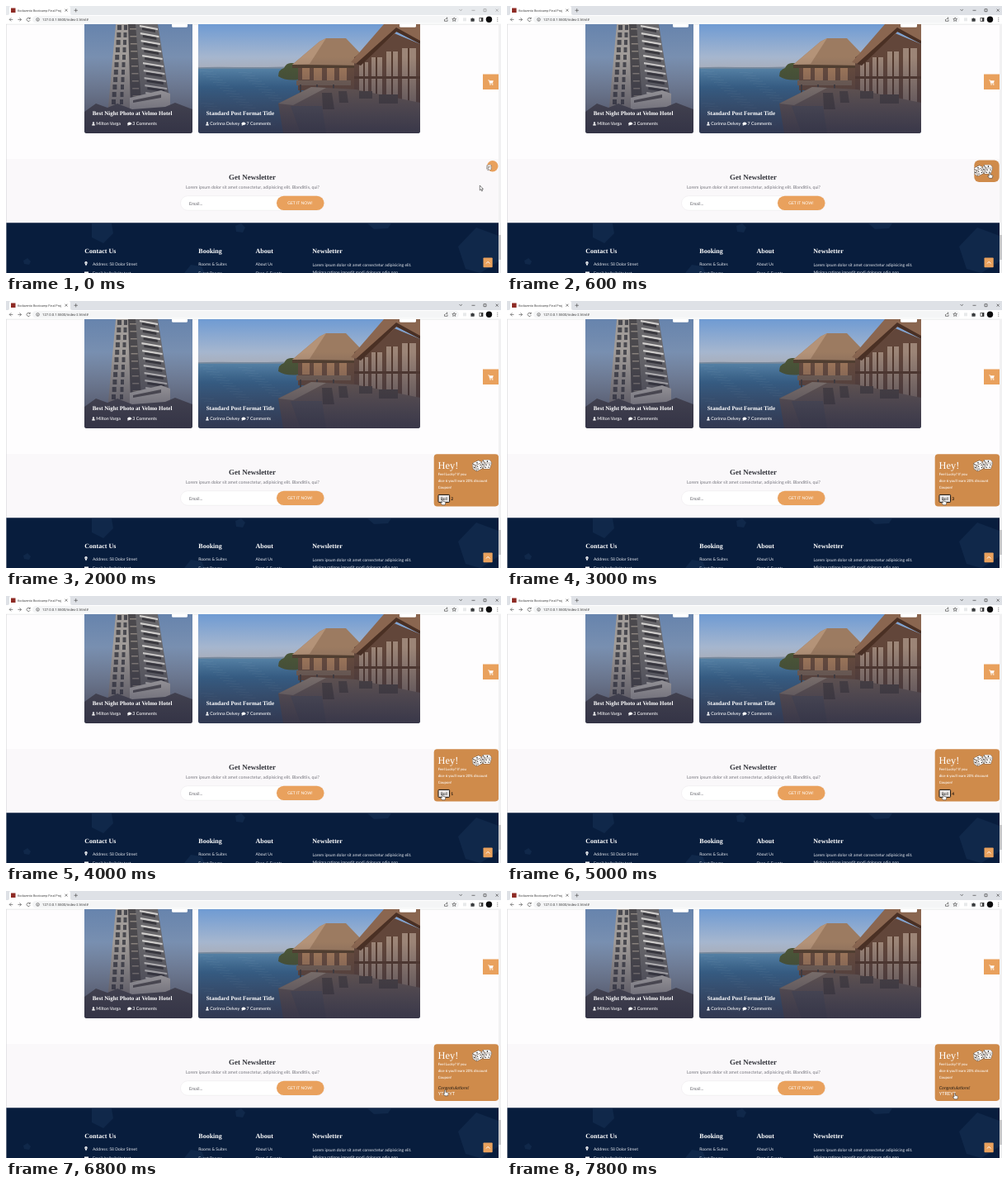
Write an HTML page that moves like this. It is 600 by 323 pixels and loops after 8 s.

```html
<!DOCTYPE html>
<html lang="en">
<head>
<meta charset="utf-8">
<title>Newsletter dice widget</title>
<style>
  html, body { margin: 0; width: 100%; height: 100%; overflow: hidden; background: #fff; }
  svg { display: block; width: 100vw; height: 100vh; }
  text { font: 5px Lato, sans-serif; text-rendering: geometricPrecision; }
  .head { font: bold 8px "Liberation Serif", serif; fill: #fff; }
  .card { font-size: 7px; }
  .meta { font-size: 5.3px; font-weight: 500; }
  .tab { font: 3.8px Roboto, sans-serif; fill: #444; }
  .line { fill: none; stroke: #555; stroke-width: .7; }
  .promo { font-size: 4.4px; font-weight: 500; }
</style>
</head>
<body>
<svg viewBox="0 0 600 323" preserveAspectRatio="none">
  <defs>
    <linearGradient id="shade" x2="0" y2="1">
      <stop offset=".3" stop-color="#2b2b40" stop-opacity="0"/>
      <stop offset=".85" stop-color="#2b2b40" stop-opacity=".62"/>
      <stop offset="1" stop-color="#2b2b40" stop-opacity=".78"/>
    </linearGradient>
    <linearGradient id="dusk" x2="0" y2="1">
      <stop stop-color="#6784ad"/><stop offset="1" stop-color="#a0a9b8"/>
    </linearGradient>
    <linearGradient id="sky" x2="0" y2="1">
      <stop stop-color="#6f9bd3"/><stop offset="1" stop-color="#b9c0cd"/>
    </linearGradient>
    <linearGradient id="sea" x2="0" y2="1">
      <stop stop-color="#5c8db3"/><stop offset=".3" stop-color="#3a719f"/><stop offset="1" stop-color="#48698f"/>
    </linearGradient>
    <linearGradient id="deck" x2="0" y2="1">
      <stop stop-color="#756257"/><stop offset="1" stop-color="#6d6468"/>
    </linearGradient>
    <clipPath id="clipA"><path d="M95 22h131v129q0 3-3 3h-125q-3 0-3-3z"/></clipPath>
    <clipPath id="clipB"><path d="M233 22h269v129q0 3-3 3h-263q-3 0-3-3z"/></clipPath>
    <clipPath id="clipPanel"><rect id="panelClip"/></clipPath>
    <clipPath id="page"><rect y="22" width="597" height="301"/></clipPath>
    <g id="person" fill="#fff"><circle r="1.1" cy="-1.1"/><path d="M-1.8 2q0-2.1 1.8-2.1t1.8 2.1z"/></g>
    <g id="chat" fill="#fff"><ellipse rx="2.4" ry="1.8"/><path d="M-2 .5l-.3 2 2.2-.9z"/></g>
    <g id="die">
      <path d="M-5-4L3-6 6.5-3 6 5-2 7-6 3z" fill="#5a4a3e"/>
      <path d="M-4.7-3.7L3-5.6 6.2-2.8-1.5-.9z" fill="#fff"/>
      <path d="M-5.2-3L-1.9-.4-2.1 6.5-5.7 2.8z" fill="#dedbd8"/>
      <path d="M-1.4-.4L6.2-2.2 5.6 4.7-1.6 6.5z" fill="#f5f3f1"/>
      <g fill="#1c1a19"><circle cx=".7" cy="-3.2" r=".8"/><circle cx="-3.8" cy="1.7" r=".7"/>
      <circle cx=".3" cy="1.2" r=".65"/><circle cx="4.2" cy=".2" r=".65"/>
      <circle cx=".2" cy="4.3" r=".65"/><circle cx="3.9" cy="3.3" r=".65"/></g>
    </g>
  </defs>

  <rect width="600" height="323" fill="#fefdfe"/>

  <!-- browser bar -->
  <rect id="bar" width="600" height="11"/>
  <path d="M2 11q2 0 2-2V2q0-2 2-2h70q2 0 2 2v7q0 2 2 2z" fill="#fff"/>
  <rect y="11" width="600" height="11" fill="#fff"/>
  <rect x="32" y="12" width="517" height="8.6" rx="4.3" fill="#f4f5f6"/>
  <path d="M0 22.2H600" stroke="#dcdde0" stroke-width=".6"/>
  <rect x="6" y="2.5" width="5.5" height="5.5" fill="#8e2b25"/>
  <text class="tab" x="14" y="6.8">Kodavento Bootcamp Final Proj</text>
  <text class="tab" x="44" y="17.9" style="font-size:4.25px">127.0.0.1:5500/index-2.html#</text>
  <path class="line" d="M71.5 3.7l3 3m0-3l-3 3M82.5 5.3h4.4m-2.2-2.2v4.4"/>
  <path id="controls" class="line" d="M549.5 4l1.7 1.7L552.9 4M564.5 5.3h4M579 3.7h3v3h-3zM593.7 3.7l3 3m0-3l-3 3"/>
  <path class="line" d="M8.3 16.4H4.2m2-2l-2 2 2 2M14.4 16.4h4.1m-2-2l2 2-2 2M29 15.2a2.1 2.1 0 1 0 .2 2M29.2 13.7v1.7h-1.7"/>
  <circle class="line" cx="38.5" cy="16.4" r="1.8"/><path class="line" d="M38.5 16.2v1.2"/>
  <path class="line" d="M531.5 16v2.3h3.6V16.5M532.5 16.3q.5-1.6 2.5-1.6m-1-1l1.2 1-1.2 1M543.2 13.9l.7 1.6 1.7.1-1.3 1.1.4 1.7-1.5-.9-1.5.9.4-1.7-1.3-1.1 1.7-.1z"/>
  <rect x="554" y="14.3" width="4" height="4" fill="#e8eaeb"/>
  <path d="M563.4 15h1.4q.7-1.7 1.4 0h1.4v1.4q1.3.6 0 1.2v1.2h-4.2z" fill="#3a3c3e"/>
  <rect x="574" y="14.3" width="4" height="4.2" fill="none" stroke="#333" stroke-width=".7"/><path d="M576 14.3h2v4.2h-2z" fill="#333"/>
  <circle cx="585.5" cy="16.3" r="3.7" fill="#0b0b0c"/>
  <g fill="#555"><circle cx="595.8" cy="14.6" r=".5"/><circle cx="595.8" cy="16.4" r=".5"/><circle cx="595.8" cy="18.2" r=".5"/></g>

  <!-- tower card -->
  <g clip-path="url(#clipA)">
    <path d="M95 22h131v132h-131z" fill="url(#dusk)"/>
    <path d="M121 154L133 22h22l6 132z" fill="#a09b98"/>
    <path d="M148 22h11l9 132h-16z" fill="#4b494d"/>
    <path d="M157 22h27l15 96v36h-32z" fill="#68676b"/>
    <g id="tower"></g>
    <path d="M150 111l38-9 11 4v20h-49z" fill="#c9c6c3"/>
    <path d="M154 114l34-7v4l-34 6z" fill="#5d5a5c"/>
    <path d="M95 128l14-10 14 5 12-5 18 7 40-3 12-5 21 8v30H95z" fill="#55545c"/>
    <path d="M95 22h131v132h-131z" fill="url(#shade)"/>
    <rect x="201" y="20" width="19" height="5.8" rx="1.5" fill="#fff"/>
  </g>

  <!-- villa card -->
  <g clip-path="url(#clipB)">
    <path d="M233 22h269v54h-269z" fill="url(#sky)"/>
    <path d="M233 75h269v79h-269z" fill="url(#sea)"/>
    <path d="M233 75.7v-1.4q20-1 45-.4t60-.4v2.2z" fill="#8395a8"/>
    <g id="waves" fill="none" stroke="#8fb2cd" stroke-width=".5" opacity=".3"></g>
    <path d="M330 85q0-8 7-10 3-7 10-6 6-1 8 6v14q-16 2-25-4z" fill="#4d5936"/>
    <path d="M354 66h80v36h-80z" fill="#6b4d3d"/>
    <path d="M359 72h9v17h-9zm14 0h10v19h-10zm16 0h9v19h-9zm15 0h9v22h-9z" fill="#a87d5c"/>
    <path d="M347 71l33-28 8-4h24l24 25-10 8z" fill="#9c7b61"/>
    <path d="M347 71l33-28 8-4-20 31z" fill="#b49378"/>
    <path d="M347 71l79 1 10-8v4l-8 7H347z" fill="#54402f"/>
    <path d="M352 90h66v6h-66z" fill="#7d6859"/>
    <path d="M356 95h2v13h-2zm20 0h2v13h-2zm20 0h2v13h-2z" fill="#47413f"/>
    <path d="M422 62l46-30 34 14v82h-80z" fill="#62463a"/>
    <path d="M428 68h11v37h-11zm15-6h13v47h-13zm18-7h14v57h-14zm19-4h17v67h-17z" fill="#9c8577"/>
    <path d="M433 68h2v37h-2zm15-6h2v47h-2zm19-7h2v57h-2zm20-4h2v67h-2z" fill="#553a2d"/>
    <path d="M422 85h80v3h-80z" fill="#553a2d"/>
    <path d="M418 68l40-46h44v22l-26-15-47 42z" fill="#8a6650"/>
    <path d="M424 70l49-44 29 16v4l-29-15-43 41z" fill="#4a3024"/>
    <path d="M330 118l40-20 54 3 78 16v37H336z" fill="url(#deck)"/>
    <path d="M330 118l40-20 18 1-40 21z" fill="#9a8a7d"/>
    <path d="M383 105h12l3 20h-14zm20-2h10l2 14h-11zM428 103h16v9h-16zm24 4h23v11h-23z" fill="#514744"/>
    <path d="M345 121h38l5 33h-31z" fill="#5f5d64"/>
    <path d="M233 22h269v132h-269z" fill="url(#shade)"/>
    <rect x="477" y="20" width="20" height="5.8" rx="1.5" fill="#fff"/>
  </g>

  <g fill="#fff">
    <text class="head card" x="104.7" y="131.5">Best Night Photo at Velmo Hotel</text>
    <text class="head card" x="242.7" y="131.5">Standard Post Format Title</text>
    <use href="#person" x="106" y="142.4"/><text class="meta" x="109.3" y="144.4">Milton Varga</text>
    <use href="#chat" x="149.7" y="142.3"/><text class="meta" x="153.3" y="144.4">3 Comments</text>
    <use href="#person" x="244" y="142.4"/><text class="meta" x="247.3" y="144.4">Corinna Delvey</text>
    <use href="#chat" x="288" y="142.3"/><text class="meta" x="291.5" y="144.4">7 Comments</text>
  </g>

  <!-- newsletter -->
  <path d="M0 185h597v78H0z" fill="#faf8fa"/>
  <text class="head" x="298.5" y="209.8" text-anchor="middle" style="font-size:9px;fill:#33343b">Get Newsletter</text>
  <text x="299" y="221" text-anchor="middle" fill="#74747c" style="font-size:5.27px">Lorem ipsum dolor sit amet consectetur, adipisicing elit. Blanditiis, qui?</text>
  <rect x="211.5" y="229.7" width="174.5" height="17.6" rx="8.8" fill="#fff" stroke="#efedf0" stroke-width=".7"/>
  <text x="222" y="240.5" fill="#66666c" style="font-size:5.3px">Email...</text>
  <rect x="328" y="229.7" width="57.5" height="17.3" rx="8.65" fill="#e9a15d"/>
  <text x="356.5" y="240.2" text-anchor="middle" fill="#fff">GET IT NOW!</text>

  <!-- footer -->
  <path d="M0 262.2h597v61H0z" fill="#081d3d"/>
  <g fill="#10284a">
    <path d="M104 263h24l2 12-12 12-14-7z"/><path d="M278 266l7-3 5 5-3 6-8-1z"/>
    <path d="M438 263h29l-4 6-17 1z"/><path d="M548 291l22-23 27 10v31l-22 14-18-5z"/>
    <path d="M21 308l5-3 4 4-2 4-6-1z"/><path d="M216 323l8-10 13 2 4 8z"/>
  </g>
  <g fill="#e6e9ef">
    <text class="head" x="95.3" y="298.8">Contact Us</text>
    <text class="head" x="233.3" y="298.8">Booking</text>
    <text class="head" x="302.5" y="298.8">About</text>
    <text class="head" x="371.3" y="298.8">Newsletter</text>
    <path d="M97 314.5l-1.5-3a1.7 1.7 0 1 1 3 0z" fill="#fff"/><circle cx="97" cy="311" r=".6" fill="#081d3d"/>
    <path d="M95 321.5h5v1.5h-5z" fill="#fff"/>
    <text x="105" y="314">Address: 58 Dolor Street</text>
    <text x="105" y="324.8">Email: hello@site.test</text>
    <text x="233.3" y="314">Rooms &amp; Suites</text><text x="233.3" y="324.8">Event Rooms</text>
    <text x="302.5" y="314">About Us</text><text x="302.5" y="324.8">Shop &amp; Events</text>
    <text x="371.5" y="314.8">Lorem ipsum dolor sit amet consectetur adipisicing elit.</text>
    <text x="371.5" y="323.8">Minima ratione impedit modi dolorum odio non</text>
  </g>
  <rect x="578.5" y="304.5" width="11.2" height="11.7" rx=".8" fill="#e9a15d"/>
  <path d="M582 311.5l2.2-2.2 2.2 2.2" fill="none" stroke="#fff"/>

  <!-- side controls -->
  <path d="M578 82.5h19v18.5h-19z" fill="#e9a15d"/>
  <path d="M584.3 89.8h1.3l.9 4h3.8" fill="none" stroke="#fff" stroke-width=".8"/>
  <path d="M585.8 90.3h5l-.8 2.8h-3.6z" fill="#fff"/><circle cx="587" cy="95" r=".7" fill="#fff"/><circle cx="589.8" cy="95" r=".7" fill="#fff"/>
  <path d="M.3 22v301" stroke="#cfcfd2" stroke-width=".6"/>
  <path d="M597 22h3v301h-3z" fill="#f1f1f2"/><path d="M597.4 277h2.2v30h-2.2z" fill="#b9babd"/>

  <!-- dice widget -->
  <g clip-path="url(#page)">
    <rect id="panel"/>
    <g id="content" clip-path="url(#clipPanel)" fill="#fff">
      <text class="head" x="523.6" y="202.6" style="font-size:12.4px;font-weight:normal">Hey!</text>
      <text class="promo" x="523.7" y="211.2">Feel Lucky? If you</text>
      <text class="promo" x="523.7" y="219.2">dice 6 you'll earn 20% discount</text>
      <text class="promo" x="523.7" y="227">Coupon!</text>
      <use href="#die" transform="translate(571 199) rotate(-12)"/>
      <use href="#die" transform="translate(582 197) rotate(14)"/>
      <g id="game">
        <rect x="524" y="234.4" width="13.6" height="9" rx=".8" fill="#ece9e8" stroke="#17110d"/>
        <text x="530.9" y="240.6" text-anchor="middle" fill="#222">Roll</text>
        <text id="score" x="539.3" y="240.7" fill="#221811" style="font-weight:bold"></text>
      </g>
      <g id="prize">
        <text x="523.7" y="239.8" fill="#2d2219" style="font-style:italic;font-size:5.5px">Congratulations!</text>
        <text x="523.7" y="247.4" style="font-size:5.6px">YTREYT</text>
      </g>
    </g>
    <use id="badge" href="#die" transform="translate(585.3 195) scale(.5 .6)"/>
  </g>
  <path id="arrow" d="M0 0v6l1.4-1.2 1 2.2 1-.5-1-2.1h1.8z" fill="#fff" stroke="#333" stroke-width=".6"/>
  <path id="hand" d="M-.7.5q.7-1 1.4 0v2.4l2.6.7q.7.3.5 1.1l-.6 2.6H-.4l-2-2.7q.3-.9 1.7.1z" fill="#fff" stroke="#222" stroke-width=".5"/>
</svg>
<script>
const LOOP = 8000, STEP = 200, OPEN = 400, WIN = 6600;
const $ = id => document.getElementById(id);
const clamp = v => Math.max(0, Math.min(1, v));
const mix = (a, b, p) => a + (b - a) * p;
const ease = p => p * p * (3 - 2 * p);
const place = (id, x, y) => $(id).setAttribute('transform', `translate(${x} ${y})`);
const show = (id, on) => $(id).style.display = on ? '' : 'none';

// time, x, y of the pointer tip
const track = [
  [0, 574.3, 217], [400, 586, 199], [800, 584, 203], [1200, 531.5, 234.5],
  [1800, 529, 239.4], [5000, 529, 239.4], [5800, 530, 240],
  [6600, 530, 240], [7200, 539, 242], [7800, 542.7, 244.5]
];
const rolls = [[1600, 2], [2200, 5], [2800, 3], [3400, 2], [3800, 1], [4400, 5], [4800, 4], [5600, 1], [6400, 6]];

function pointer(t) {
  const i = track.findIndex(k => k[0] > t);
  if (i < 0) return track.at(-1).slice(1);
  const [a, b] = [track[i - 1], track[i]];
  const p = ease((t - a[0]) / (b[0] - a[0]));
  return [mix(a[1], b[1], p), mix(a[2], b[2], p)];
}

function setBox(id, box) {
  for (const [key, value] of Object.entries(box)) $(id).setAttribute(key, value);
}

function drawDetails() {
  let tower = '';
  for (let i = 0; i < 11; i++) {
    const y = 23 + i * 9, x = 162 + i * .8, w = 22 + i * .6;
    tower += `<path d="M${x} ${y}l${w} 4v2.2l-${w}-4z" fill="#d0cecc"/>`
      + `<path d="M${x + 3} ${y + 3}l${w - 6} 3v3l-${w - 6}-3z" fill="#3a393f"/>`
      + `<path d="M${135 - i * .7} ${y}h5v6h-5zM${143 - i * .5} ${y}h4v6h-4z" fill="#4a4a50"/>`
      + `<path d="M${150 + i * .4} ${y + 4}h8v1.6h-8z" fill="#89827d"/>`;
  }
  $('tower').innerHTML = tower;
  let waves = '';
  for (let i = 0; i < 40; i++) waves += `M${235 + (i * 47) % 90} ${79 + i * 1.7}q4-1 8 0t8 0`;
  $('waves').innerHTML = `<path d="${waves}"/>`;
}

function render(ms) {
  const t = Math.floor(ms / STEP) * STEP;
  const p = ease(clamp((t - OPEN) / 600));
  const won = t >= WIN;
  const hover = t >= OPEN;
  const box = {
    x: mix(583, 518.7, p), y: mix(187, 185.3, p),
    width: mix(13.5, 78.5, p), height: mix(13.5, won ? 68.7 : 63.2, p), rx: mix(6.75, 4, p)
  };
  setBox('panel', box);
  setBox('panelClip', box);
  $('panel').setAttribute('fill', p > 0 ? '#cf8b4b' : '#e9a15d');
  $('bar').setAttribute('fill', hover ? '#dee1e6' : '#e7eaed');
  $('controls').style.stroke = hover ? '#444' : '#999';
  show('badge', p === 0);
  show('content', p > 0);
  show('game', !won);
  show('prize', won);
  const roll = rolls.filter(r => r[0] <= t).pop();
  $('score').textContent = roll ? roll[1] : '';
  place(hover ? 'hand' : 'arrow', ...pointer(t));
  show('hand', hover);
  show('arrow', !hover);
}

function tick() {
  render(performance.now() % LOOP);
  requestAnimationFrame(tick);
}

drawDetails();
tick();
</script>
</body>
</html>
```
